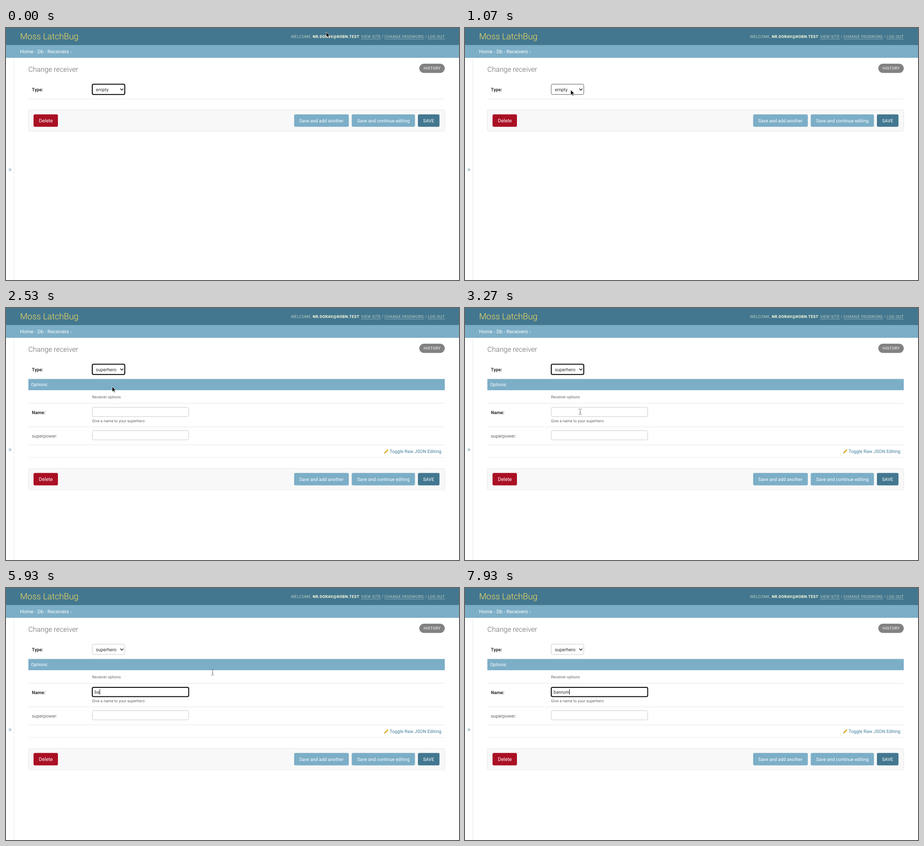
Animation, 1003 px wide and 558 px high, one loop 8000 ms. Source, as an HTML page:

```html
<!DOCTYPE html>
<html lang="en">
<head>
<meta charset="utf-8">
<title>Change receiver</title>
<style>
html, body { margin: 0; width: 100%; height: 100%; overflow: hidden; background: #fff; }
svg { display: block; width: 100%; height: 100%; font: 10.2px Roboto, sans-serif; fill: #333; text-rendering: geometricPrecision; }
.dark { fill: #437790; }
.light { fill: #7caec7; }
.white { fill: #fff; }
.grey { fill: #666; }
.link { fill: #447e9b; }
.thin { font-weight: 300; }
.bold { font-weight: 700; }
.small { font-size: 8.65px; }
.spaced { font-size: 8.65px; letter-spacing: .39px; }
.crumbs { font-size: 11px; }
.mid { text-anchor: middle; }
.line { stroke: #e6e6e6; stroke-width: 1; fill: none; }
.field { fill: #fff; stroke: #c8c8c8; stroke-width: 1; }
.field.active { stroke: #555; }
.field.ring { stroke: #050505; stroke-width: 2; }
</style>
</head>
<body>
<svg viewBox="0 0 1003 558">
  <rect class="dark" width="1003" height="38"/>
  <rect class="light" y="37.7" width="1003" height="28.3"/>
  <text class="thin" x="31.3" y="25.2" font-size="18.86" fill="#f5dd5d">Moss LatchBug</text>

  <g class="spaced thin" fill="#ffffdc">
    <text x="631" y="22">WELCOME,</text>
    <text class="bold" x="679.2" y="22">NR.DORAV@KOBN.TEST</text>
    <text x="781.5" y="22">.</text>
    <text x="786.3" y="22">VIEW SITE</text>
    <text x="832" y="22">/</text>
    <text x="838" y="22">CHANGE PASSWORD</text>
    <text x="928" y="22">/</text>
    <text x="934" y="22">LOG OUT</text>
    <path d="M786 24.5H830M838 24.5H925.5M934 24.5H972" stroke="#fff" stroke-opacity=".4"/>
  </g>

  <text class="crumbs white" x="31.3" y="55.6">Home <tspan fill="#c4dce8">›</tspan> Db <tspan fill="#c4dce8">›</tspan> Receivers <tspan fill="#c4dce8">›</tspan></text>

  <path class="line" d="M17.5 66V558"/>
  <text class="link thin mid" x="8.7" y="317.6" font-size="15.7">»</text>

  <text class="grey thin" x="49.5" y="96.6" font-size="15.7">Change receiver</text>
  <rect x="915" y="79" width="56.6" height="20.6" rx="10.3" fill="#828282"/>
  <text class="spaced white mid" x="943.5" y="92.2">HISTORY</text>

  <text class="bold" x="57.3" y="139.7">Type:</text>
  <rect id="select" class="field" x="191" y="124.4" width="72" height="22.8" rx="3"/>
  <text id="choice" x="199" y="139.5"></text>
  <path d="M253.2 134.3l3.3 3.4 3.3-3.4" fill="none" stroke="#222" stroke-width="1.6"/>
  <path class="line" d="M49.5 157H971.5"/>

  <g id="options">
    <rect class="light" x="49.5" y="157.3" width="922" height="24.7"/>
    <text class="white" x="55.6" y="173.3">Options:</text>
    <text class="small grey" x="190.5" y="200">Receiver options</text>
    <path class="line" d="M49.5 211H971.5M49.5 263H971.5M49.5 303H971.5M49.5 331H971.5"/>
    <text class="bold" x="57.3" y="235.3">Name:</text>
    <rect id="name" class="field" x="191" y="220" width="213.5" height="20.4" rx="3"/>
    <text id="typed" x="196" y="233.8"></text>
    <path id="caret" stroke="#111" stroke-width="1"/>
    <text class="small grey" x="190.5" y="252.6">Give a name to your superhero</text>
    <text class="grey" x="57.3" y="287">superpower:</text>
    <rect class="field" x="191" y="271.6" width="213.5" height="20.4" rx="3"/>
    <path d="M837.5 322l1-3.4 6-6 2.4 2.4-6 6Z" fill="#e8b93c"/>
    <path d="M837.5 322l.6-1.9 1.3 1.3Z" fill="#555"/>
    <text class="link" x="964" y="321" text-anchor="end">Toggle Raw JSON Editing</text>
  </g>

  <g id="actions">
    <rect class="line" style="fill:#f8f8f8" x="49.5" y="181.3" width="922" height="47" rx="3"/>
    <rect x="61" y="191.3" width="54" height="27.4" rx="3" fill="#aa1024"/>
    <rect class="light" x="638" y="191.3" width="121" height="27.4" rx="3"/>
    <rect class="light" x="765.5" y="191.3" width="140" height="27.4" rx="3"/>
    <rect class="dark" x="912" y="191.3" width="47.8" height="27.4" rx="3"/>
    <g class="white mid">
      <text x="88.2" y="208.7" font-size="11">Delete</text>
      <text x="698.4" y="208.6">Save and add another</text>
      <text x="835.6" y="208.6">Save and continue editing</text>
      <text x="935.8" y="208.6">SAVE</text>
    </g>
  </g>

  <path id="arrow" d="M0 0V11.6L2.7 9.1 4.5 13.3 6.4 12.5 4.6 8.4H8.2Z" fill="#000" stroke="#fff" stroke-width=".8"/>
  <path id="beam" d="M-3.5-6Q0-6 0-4.5Q0-6 3.5-6M-3.5 6Q0 6 0 4.5Q0 6 3.5 6M0-5V5M-1.5 1.5H1.5" fill="none" stroke="#777" stroke-width="1"/>
</svg>
<script>
const LOOP = 8000;
const $ = id => document.getElementById(id);
const show = (id, on) => $(id).setAttribute("visibility", on ? "visible" : "hidden");

// Pointer positions held until the next one: time, x, y.
const stops = [
  [0, 709, 9], [70, 650, 34], [137, 565, 70], [203, 485, 104], [270, 425, 129],
  [470, 391.5, 141], [870, 234, 137], [2070, 235, 174]
];
const glide = { start: 2800, end: 3330, steps: 8, from: [235, 174], to: [256, 232] };
const keyTimes = [5600, 5800, 6530, 6670, 7130, 7270];
const word = "banrum";

function pointerAt(t) {
  if (t >= 4870) return [457.5, 187];
  if (t >= 4000) return [255.5, 228.7];
  if (t >= glide.start) {
    const raw = Math.min(1, (t - glide.start) / (glide.end - glide.start));
    const p = (Math.floor(raw * (glide.steps - 1)) + 1) / glide.steps;
    const eased = p * p * (3 - 2 * p);
    return glide.from.map((v, i) => v + (glide.to[i] - v) * eased);
  }
  return stops.filter(s => s[0] <= t).pop().slice(1);
}

function draw(t) {
  const open = t >= 2530, naming = t >= 4270;
  const ringed = t < 1070 || open && !naming;
  $("select").setAttribute("class", "field" + (ringed ? " ring" : open ? "" : " active"));
  $("choice").textContent = open ? "superhero" : "empty";
  show("options", open);
  $("actions").setAttribute("transform", `translate(0 ${open ? 174 : 0})`);

  $("name").setAttribute("class", "field" + (naming ? " ring" : ""));
  const typed = $("typed");
  typed.textContent = word.slice(0, keyTimes.filter(k => k <= t).length);
  const caretX = 196.5 + (typed.textContent ? typed.getComputedTextLength() : 0);
  $("caret").setAttribute("d", `M${caretX} 224V236`);
  show("caret", naming);

  const [x, y] = pointerAt(t);
  const overText = t >= 4000 || open && y > 220;
  for (const id of ["arrow", "beam"]) $(id).setAttribute("transform", `translate(${x} ${y})`);
  show("arrow", !overText);
  show("beam", overText && t < 6870);
}

const begin = performance.now();
function tick() {
  draw((performance.now() - begin) % LOOP);
  requestAnimationFrame(tick);
}
tick();
</script>
</body>
</html>
```
